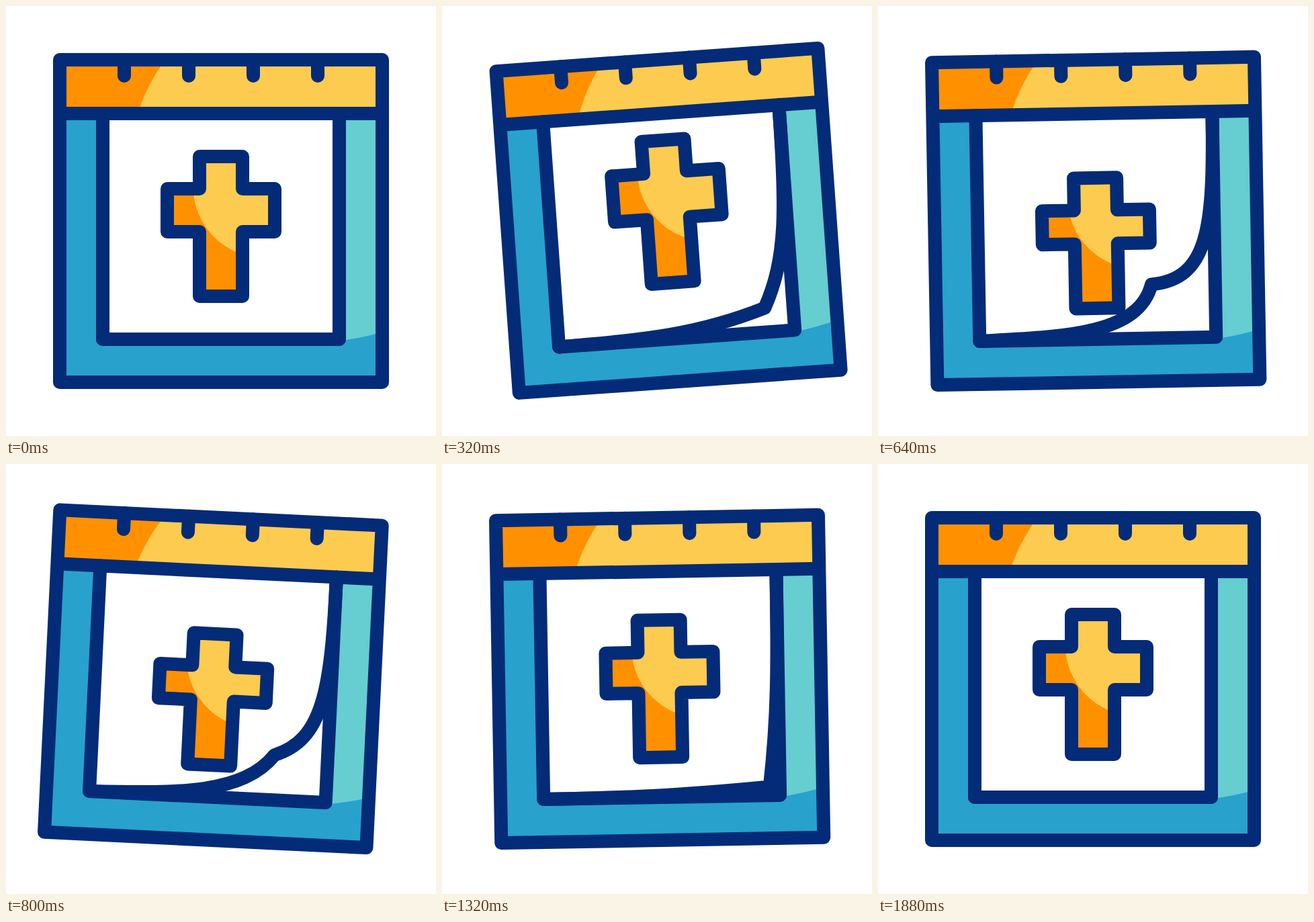
An HTML page for the animation above (2 s loop, 640 by 640 pixels).

```html
<!DOCTYPE html>
<html lang="en">
<head>
<meta charset="utf-8">
<title>Swinging calendar</title>
<style>
  html, body { margin: 0; width: 100%; height: 100%; overflow: hidden; background: #fff; }
  svg { display: block; width: 100vw; height: 100vh; }
  .line { fill: none; stroke: #032b77; stroke-width: 20; stroke-linecap: round; stroke-linejoin: round; }
</style>
</head>
<body>
<svg viewBox="0 0 640 640">
  <clipPath id="crossClip"><path class="cross"/></clipPath>
  <g id="calendar">
    <path fill="#28a1cd" d="M80 80H560V560H80Z"/>
    <path fill="#66cdd1" d="M496 160H560V485.5Q530 494 496 498.5Z"/>
    <path fill="#ff9100" d="M80 80H560V160H80Z"/>
    <path fill="#fdcb50" d="M560 80H237Q210 117 196 160H560Z"/>
    <path fill="#fff" d="M144 160H496V496H144Z"/>
    <path class="line" d="M144 160V496H496V160"/>
    <path class="line" id="page"/>
    <g clip-path="url(#crossClip)">
      <path fill="#ff9100" d="M200 160H440V500H200Z"/>
      <circle id="shine" fill="#fdcb50" cx="385" r="106.5"/>
    </g>
    <path class="line cross"/>
    <path class="line" d="M80 80H560V560H80ZM80 160H560"/>
    <path class="line" id="notches"/>
  </g>
</svg>
<script>
  const LOOP = 2000, STEP = 40;
  const $ = id => document.getElementById(id);
  const crosses = document.querySelectorAll('.cross');

  // Smooth 0 to 1 between two times.
  function ramp(t, from, to) {
    const u = Math.min(1, Math.max(0, (t - from) / (to - from)));
    return u * u * (3 - 2 * u);
  }

  // Smooth 0 to 1 and back to 0.
  const bump = (t, rise, peak, end) => ramp(t, rise, peak) - ramp(t, peak, end);

  const swing = t =>
    -5 * bump(t, 0, 440, 840) + 3 * bump(t, 440, 840, 1280) - bump(t, 840, 1280, 1880);

  // The lower right corner of the sheet, from flat (p = 0) to fully curled (p = 1).
  function pagePath(p) {
    const mix = (x, y, dx, dy) => `${x + dx * p} ${y + dy * p}`;
    return `M496 160C${mix(496, 300, 0, 39)} ${mix(496, 372, -11, 40)} ${mix(496, 496, -103, -87)}` +
      `C${mix(320, 496, 66, -6)} ${mix(270, 496, 0, -5)} 144 496`;
  }

  function crossPath(top, base) {
    const head = 224 + top, armTop = 272 + top, armBase = 336 + base, foot = 432 + base;
    return `M288 ${head}H352V${armTop}H400V${armBase}H352V${foot}` +
      `H288V${armBase}H240V${armTop}H288Z`;
  }

  function draw(t) {
    const lift = bump(t, 0, 300, 600), drop = bump(t, 300, 600, 1680);
    const base = 18 * drop - 20 * lift;
    const cross = crossPath(32 * drop - 24.7 * lift, base);
    const curl = bump(t, 225, 440, 1600);
    $('calendar').setAttribute('transform', `rotate(${swing(t)} 320 80)`);
    $('page').setAttribute('d', pagePath(curl));
    $('shine').setAttribute('cy', 268.5 + base);
    crosses.forEach(el => el.setAttribute('d', cross));
  }

  let notches = '';
  for (let x = 176; x < 560; x += 96) notches += `M${x} 80V104`;
  $('notches').setAttribute('d', notches);

  const start = performance.now();
  function tick() {
    const t = (performance.now() - start) % LOOP;
    draw(Math.floor(t / STEP) * STEP);
    requestAnimationFrame(tick);
  }
  tick();
</script>
</body>
</html>
```
